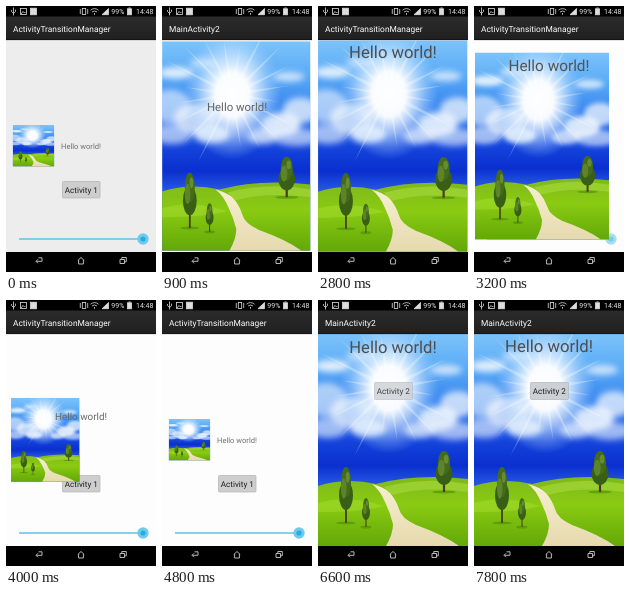
Write an HTML page that moves like this. It is 150 by 266 pixels and loops after 8000 ms.

```html
<!DOCTYPE html>
<html lang="en">
<head>
<meta charset="utf-8">
<title>Activity transition</title>
<style>
  html, body { margin: 0; width: 100%; height: 100%; overflow: hidden; background: #000; }
  #stage { display: block; width: 100vw; height: 100vh; }
  text { font-family: Roboto, "Noto Sans", sans-serif; text-rendering: geometricPrecision; }
</style>
</head>
<body>
<svg id="stage" viewBox="0 0 150 266" preserveAspectRatio="none">
  <defs>
    <linearGradient id="sky" x2="0" y2="1">
      <stop offset="0" stop-color="#7cc3fa"/>
      <stop offset=".16" stop-color="#5aaaf6"/>
      <stop offset=".34" stop-color="#327fee"/>
      <stop offset=".5" stop-color="#1445dc"/>
      <stop offset=".62" stop-color="#0a2fcf"/>
      <stop offset=".72" stop-color="#2a5be4"/>
    </linearGradient>
    <radialGradient id="sun">
      <stop offset="0" stop-color="#fff"/>
      <stop offset=".34" stop-color="#fff" stop-opacity=".96"/>
      <stop offset=".6" stop-color="#e4f2ff" stop-opacity=".6"/>
      <stop offset="1" stop-color="#a9d2ff" stop-opacity="0"/>
    </radialGradient>
    <linearGradient id="grass" x2="0" y2="1">
      <stop offset="0" stop-color="#7fb81c"/>
      <stop offset=".4" stop-color="#8acb12"/>
      <stop offset="1" stop-color="#62a808"/>
    </linearGradient>
    <linearGradient id="path" x2="0" y2="1">
      <stop offset="0" stop-color="#f6efd0"/>
      <stop offset="1" stop-color="#e6d9ae"/>
    </linearGradient>
    <linearGradient id="bar" x2="0" y2="1">
      <stop offset="0" stop-color="#2b2b2b"/>
      <stop offset="1" stop-color="#202020"/>
    </linearGradient>
    <filter id="soft" x="-20%" y="-20%" width="140%" height="140%"><feGaussianBlur stdDeviation="3"/></filter>
  </defs>

  <rect id="back" width="150" height="266" fill="#ededed"/>

  <g id="first">
    <rect x="56.5" y="175.5" width="37.5" height="16.5" rx="1" fill="#cecece" stroke="#b4b4b4" stroke-width=".7"/>
    <text x="75.3" y="186.6" font-size="8.1" text-anchor="middle" fill="#1c1c1c">Activity 1</text>
    <path d="M13 233H137" stroke="#5cc3ea" stroke-width="1.4"/>
    <circle cx="137" cy="233" r="5.7" fill="#6ccbee"/>
    <circle cx="137" cy="233" r="2.6" fill="#2da9dc"/>
  </g>

  <svg id="photo" viewBox="0 0 150 212" preserveAspectRatio="none">
    <rect width="150" height="212" fill="url(#sky)"/>
    <g id="clouds" filter="url(#soft)" fill="#eef5fd"></g>
    <ellipse cx="71" cy="54" rx="50" ry="66" fill="url(#sun)"/>
    <g id="rays" fill="#fff" opacity=".3"></g>
    <path d="M0 152Q28 143 58 150Q98 139 150 145V212H0Z" fill="url(#grass)"/>
    <path d="M66 153Q108 142 150 150V158Q108 152 74 161Z" fill="#a3d838" opacity=".7"/>
    <path d="M0 169Q30 160 66 172Q44 178 0 178Z" fill="#a0da2a" opacity=".6"/>
    <path d="M54 150Q66 153 72 159Q78 166 81 175Q83 184 98 191Q126 201 141 212H68Q75 200 75 190Q72 178 67 168Q62 156 54 150Z" fill="url(#path)"/>
    <g id="trees"></g>
  </svg>

  <g id="second">
    <rect x="56.5" y="82.5" width="38" height="17" rx="1" fill="#c6cbd0" fill-opacity=".88" stroke="#a9b0b8" stroke-width=".6"/>
    <text x="75.3" y="94" font-size="8.1" text-anchor="middle" fill="#1c1c1c">Activity 2</text>
  </g>

  <text id="hello" x="75" text-anchor="middle">Hello world!</text>

  <rect width="150" height="11" fill="#000"/>
  <rect y="10.5" width="150" height="23.5" fill="url(#bar)"/>
  <rect y="33.3" width="150" height=".8" fill="#111"/>
  <text id="title" x="7" y="25.5" font-size="8.4" fill="#fff"></text>

  <g fill="none" stroke="#ddd" stroke-width=".8">
    <path d="M7.5 1.5V9.5M5.5 4V5.5L7.5 7.5L9.5 5.7V3.6"/>
    <rect x="14.5" y="2.5" width="6" height="6"/>
    <path d="M15 8L17 5.5L18.5 7L19.5 6"/>
    <rect x="24.5" y="2.2" width="6" height="6.6" fill="#ddd"/>
    <rect x="76.3" y="2.5" width="3.4" height="6"/>
    <path d="M74.3 3V8M81.7 3V8"/>
    <path d="M84.5 4.2Q88.5 1 92.5 4.2M86 6Q88.5 4 91 6M88.5 7V8.8"/>
    <path d="M96 8.7H102.5V2.5Z" fill="#ddd"/>
    <rect x="121.5" y="2.8" width="4" height="6" fill="#ddd"/>
    <path d="M122.5 1.9H124.5"/>
  </g>
  <g font-size="7" fill="#e6e6e6">
    <text x="105.3" y="8.3">99%</text>
    <text x="130" y="8.3">14:48</text>
  </g>

  <rect y="246" width="150" height="20" fill="#000"/>
  <g fill="none" stroke="#ccc" stroke-width=".9" stroke-linejoin="round">
    <path d="M32 253.3L30 255.3L32 257.3M30.3 255.3H36V251.8H32.5"/>
    <path d="M71.8 254.5L75 251.5L78.2 254.5M72.6 254V258H77.4V254"/>
    <path d="M114 253.5H118.5V257.5H114ZM115.8 253.5V251.5H120.3V255.8H118.5"/>
  </g>
</svg>
<script>
const $ = id => document.getElementById(id);
const LOOP = 8000;

const clouds = [
  [8, 66, 22, 17], [34, 78, 22, 15], [50, 94, 18, 9], [10, 94, 20, 10],
  [140, 70, 18, 13], [120, 84, 20, 12], [136, 97, 24, 9], [102, 96, 16, 8],
  [14, 32, 18, 6], [42, 22, 14, 5], [128, 36, 16, 5]
];
$("clouds").innerHTML = clouds.map(([x, y, w, h], i) =>
  `<ellipse cx="${x}" cy="${y}" rx="${w}" ry="${h}" opacity="${0.62 + i % 3 * 0.14}"/>`).join("");

// tapering light wedges around the sun
$("rays").innerHTML = Array.from({ length: 20 }, (_, i) => {
  const len = 46 + i * 29 % 36;
  return `<path d="M71 51.5L${71 + len} 54L71 56.5Z" transform="rotate(${i * 18 + 9} 71 54)"/>`;
}).join("");

function tree(x, top, w, h, trunk) {
  const blob = (dx, dy, rx, ry, c) =>
    `<ellipse cx="${x + dx * w}" cy="${top + dy * h}" rx="${rx * w}" ry="${ry * h}" fill="${c}"/>`;
  return `<ellipse cx="${x}" cy="${top + h + trunk}" rx="${w * 0.7}" ry="1.5" fill="#4a8a0c" opacity=".6"/>` +
    `<path d="M${x} ${top + h * 0.8}V${top + h + trunk}" stroke="#4b3a20" stroke-width="${w * 0.13}"/>` +
    blob(0, 0.66, 0.5, 0.34, "#395f16") + blob(0, 0.35, 0.36, 0.35, "#436b1b") +
    blob(-0.16, 0.5, 0.2, 0.24, "#5d8428") + blob(0.12, 0.24, 0.14, 0.13, "#668c30");
}
$("trees").innerHTML = tree(28, 133, 14, 43, 13) + tree(48, 164, 8, 22, 7) + tree(126, 117, 17, 34, 7);

const clamp = v => Math.min(1, Math.max(0, v));
const span = (t, from, to) => clamp((t - from) / (to - from));
const mix = (a, b, p) => a + (b - a) * p;
const smooth = p => 0.5 - Math.cos(Math.PI * p) / 2;
const decel = p => 1 - (1 - p) ** 4;

function set(id, attrs) {
  for (const k in attrs) $(id).setAttribute(k, attrs[k]);
}

function draw(t) {
  const returning = t >= 2400 && t < 5300;
  const e = t >= 5000 ? t - 5000 : t;
  const inside = !returning && e >= 300;
  let pic, word, first, second, white;

  if (returning) {
    pic = word = 1 - smooth(span(t, 2720, 4640));
    first = span(t, 2600, 3600);
    second = 0;
    white = 1;
  } else {
    pic = decel(span(e, 260, 1245));
    word = smooth(span(e, 250, 1700));
    first = 1 - span(e, 250, 550);
    second = span(e, 1100, 1700);
    white = t >= 5300 ? 1 : span(e, 250, 550);
  }

  const grey = Math.round(mix(237, 253, white));
  set("back", { fill: `rgb(${grey},${grey},${grey})` });
  set("first", { opacity: first });
  set("second", { opacity: second });
  set("photo", {
    x: mix(6.7, 0, pic), y: mix(119, 34, pic),
    width: mix(41.6, 150, pic), height: mix(41.5, 212, pic)
  });
  const size = mix(7.6, 16.7, word);
  const ink = Math.round(mix(112, 78, word));
  set("hello", {
    y: mix(140, 46, word) + size * 0.36,
    "font-size": size,
    fill: `rgb(${ink},${ink},${ink})`
  });
  $("title").textContent = inside ? "MainActivity2" : "ActivityTransitionManager";
}

function tick() {
  draw(performance.now() % LOOP);
  requestAnimationFrame(tick);
}
tick();
</script>
</body>
</html>
```
